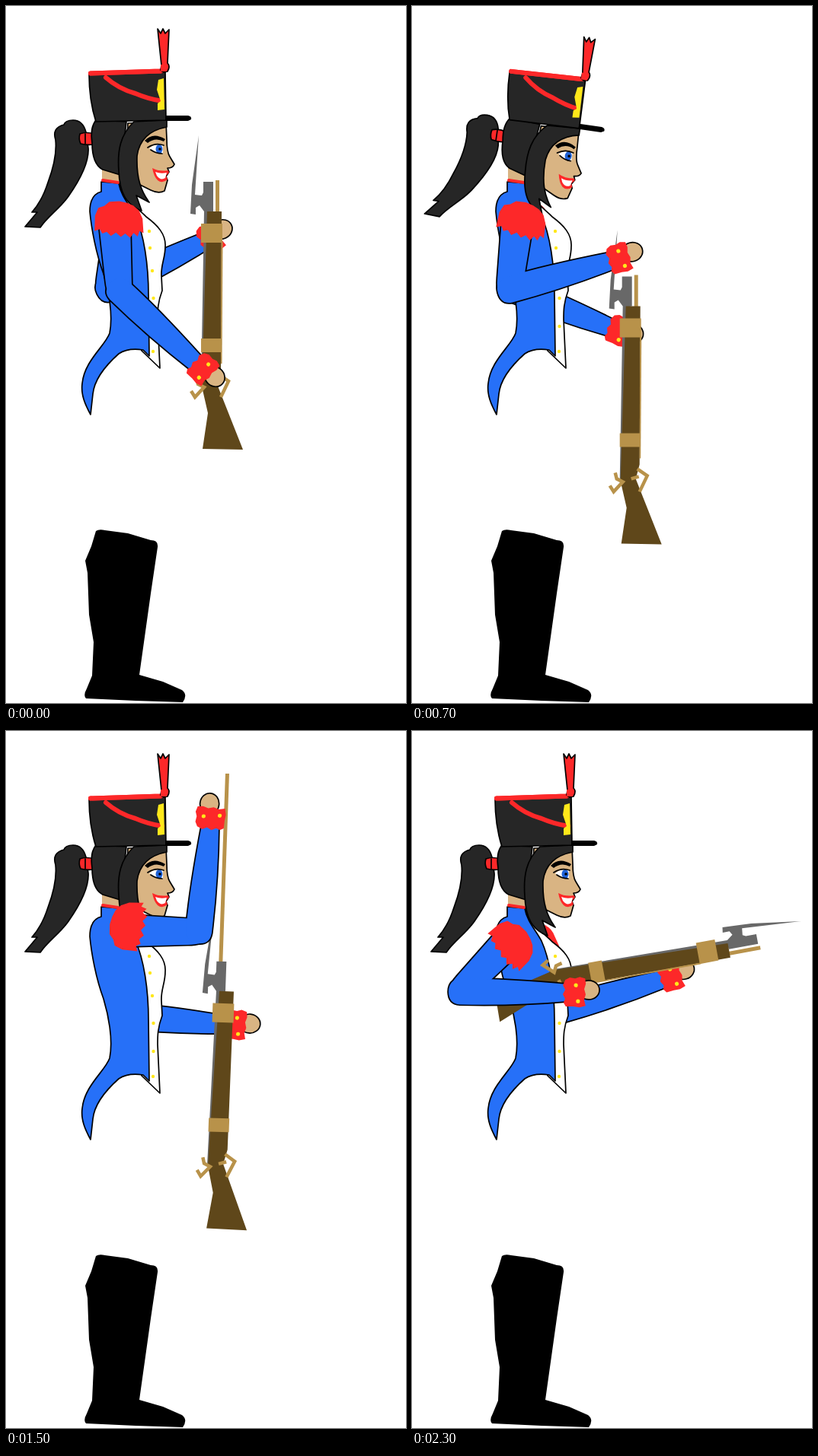
These frames come from a looping animation (525x916 px, 2.5 s). An HTML page:

```html
<!DOCTYPE html>
<html lang="en">
<head>
<meta charset="utf-8">
<title>Loading drill</title>
<style>
html, body { margin: 0; width: 100%; height: 100%; overflow: hidden; background: #fff; }
svg { display: block; width: 525px; height: 916px; }
.blue { fill: #2670f8; }
.red { fill: #fd2829; }
.skin { fill: #d9b483; }
.dark { fill: #262626; }
.wood { fill: #5f471a; }
.steel { fill: #686868; }
.brass { fill: #b8924a; }
.gold { fill: #ffe81a; }
.white { fill: #fff; }
.ink { stroke: #000; stroke-width: 1.7; stroke-linejoin: round; }
.edge { stroke: #000; stroke-width: 3.4; stroke-linejoin: round; }
.line { fill: none; stroke: #000; stroke-width: 1.7; stroke-linecap: round; }
.wire { fill: none; stroke: #b8924a; stroke-width: 4.5; }
.cord { fill: none; stroke: #fd2829; stroke-linecap: round; stroke-linejoin: round; }
</style>
</head>
<body>
<svg viewBox="0 0 525 916">
<defs>
  <path id="upper" d="M-21 14 L-17 98 Q-16 127 1 127 Q17 126 17 108 L21 14Z"/>
  <path id="fore" d="M-17 0 Q-16 -15 0 -15 Q16 -15 17 2 Q18 55 11 142 L-11 142 Q-18 70 -17 0Z"/>
  <g id="hand">
    <ellipse class="skin ink" cx="4" cy="169" rx="12.5" ry="14"/>
    <path class="red" d="M-18 139 l5 -3 5 2 6 -3 6 3 6 -3 7 3 3 6 -1 7 2 6 -2 7 -7 1 -7 -2 -7 2 -7 -2 -8 2 -2 -8 1 -8Z"/>
    <g class="gold"><circle cx="10" cy="152" r="2.6"/><circle cx="-11" cy="155" r="2.6"/></g>
  </g>
  <g id="limb">
  </g>
</defs>

<path d="M118 690 Q122 687 130 689 L160 693 L190 702 Q200 702 199 711 L190 772 L183 822 L175 879 L206 888 L231 899 Q239 905 232 915 L170 913 L105 910 Q101 906 106 897 L113 880 L115 836 L109 800 L107 745 L104 729 L112 710Z"/>

<g id="far">
  <use class="up blue edge" href="#upper"/>
  <use class="low blue edge" href="#fore"/>
  <use class="up blue" href="#upper"/>
  <use class="low blue" href="#fore"/>
  <use class="low" href="#hand"/>
  <path class="up red" d="M-20 8 Q-5 -6 15 -3 Q25 2 27 14 L28 34 L-20 34Z"/>
</g>

<g id="body">
  <path class="skin" d="M126 205 L150 212 L150 234 L126 231Z"/>
  <path class="white ink" d="M148 233 C158 258 174 266 184 277 C199 288 210 300 209 316 C209 332 203 340 204 355 L205 374 C199 390 199 400 199 412 L202 476 L178 453 L170 300Z"/>
  <path class="blue ink" d="M125 231 L148 233 C151 251 163 262 170 276 C181 300 187 340 187 380 L188 460 L180 452 Q160 449 148 457 C130 473 116 490 114 510 L111 537 C104 524 98 511 100 496 C103 466 130 447 136 430 C141 405 134 372 128 352 C118 325 112 292 110 270 Q110 248 125 244Z"/>
  <path class="cord" stroke-width="4" d="M127 229 L147 232"/>
  <g class="gold">
    <circle cx="188" cy="296" r="2.2"/><circle cx="189" cy="318" r="2.2"/><circle cx="192" cy="348" r="2.2"/>
    <circle cx="193.500" cy="384" r="2.2"/><circle cx="193.500" cy="421" r="2.2"/><circle cx="193" cy="454" r="2.2"/>
  </g>
</g>

<g id="head">
  <path class="dark ink" d="M105 166 Q101 150 88 150 Q78 150 76 156 Q60 160 65 176 C67 195 61 216 55 232 C49 251 43 261 34 271 L41 271 L25 290 L45 291 C55 276 71 266 82 250 C96 230 109 205 108 187Z"/>
  <path class="red ink" d="M97 168 Q106 165 115 168 L115 182 Q106 183 98 181 Q95 175 97 168Z"/>
  <path class="line" d="M104 168 V181"/>
  <path class="skin ink" d="M160 154 L210 153 L211 175 Q211 192 215 198 L221 208 Q219 213 212 213 L214 218 L210 224 L212 229 L208 243 Q200 247 190 242 L170 232 L158 190Z"/>
  <path class="dark ink" d="M118 150 Q110 160 113 180 Q113 208 127 215 L150 222 L158 152Z"/>
  <path class="dark ink" d="M168 152 C150 169 146 190 148 217 C149 245 158 262 178 269 L171 249 L188 258 C177 243 171 226 172 197 C175 175 190 163 211 159 L211 150Z"/>
  <path d="M182 177 Q193 165 209 175 L207 178 Q196 172 186 180Z"/>
  <path class="white" d="M188 187 Q196 180 206 183 L206 194 Q194 194 188 187Z"/>
  <ellipse cx="201" cy="188" rx="4.500" ry="6" fill="#1f62d8"/>
  <circle cx="202" cy="188" r="1.8"/>
  <path class="line" d="M186 186 Q196 179 207 183 M190 189 Q197 194 205 194"/>
  <path class="red" d="M192 213 Q201 218 213 216 L214 219 L210 223 L212 228 Q205 234 199 229 Q194 224 192 213Z"/>
  <path class="white" d="M196 218 Q203 221 211 219 L209 226 Q203 230 198 223Z"/>
  <path class="dark ink" d="M109 89 L209 87 L210 150 L118 152 Q109 124 109 89Z"/>
  <path d="M209 144 L239 144 Q244 145 243 149 L239 151 L209 151Z"/>
  <path class="cord" stroke="#000" stroke-width="6" d="M111 88.500 L203 85.500 L211 82"/>
  <path class="cord" stroke-width="6" d="M111 88.500 L203 85.500 L211 82"/>
  <path class="cord" stroke-width="6" d="M131 94 Q148 109 170 115 Q186 122 205 125"/>
  <path class="gold" d="M200 97 L207 95 L208 136 L199 137 L199 128 L203 125 L198 110Z"/>
  <path class="red ink" stroke-width="1" d="M204 78 L199 30 L203 36 L206 30 L209 36 L214 31 L212 75 Q216 79 212 86 Q205 88 203 84Z"/>
  <path class="red" d="M203 77 H211 V86 H203Z"/>
</g>

<g id="gun">
  <path id="rod" class="brass" d="M275 229 h5 v250 h-5Z"/>
  <path class="steel" d="M253 170 L248 248 L257 249 L259 245 L259 231 L272 231 L272 270 L266 271 L262 500 L256 500 L260 270 L254 262 L249 265 L249 274 L242 273 L244 235Z"/>
  <path class="wood" d="M264 270 L283 270 L282 478 L277 497 L311 583 L258 582 L265 535 L257 500 L260 400Z"/>
  <path id="seat" class="brass" d="M282.500 310 h2 l-1 160 h-1.500Z"/>
  <path class="brass" d="M256 286 h28 v25 h-28Z M256 437 h27 v18 h-27Z"/>
  <path class="wire" d="M279 484 L292 493 L282 514 M271 497 L281 494 M250 489 L252 497 L260 501 L248 514 L243 506"/>
</g>

<g id="near">
  <use class="up blue edge" href="#upper"/>
  <use class="low blue edge" href="#fore"/>
  <use class="up blue" href="#upper"/>
  <use class="low blue" href="#fore"/>
  <use class="low" href="#hand"/>
  <path class="up red" d="M-25 12 L-20 2 -12 0 -5 -5 8 -5 18 -2 26 2 33 9 37 20 37 39 32 36 29 43 24 38 19 44 13 38 7 42 1 36 -6 40 -11 34 -17 36 -20 30 -27 32Z"/>
</g>
</svg>
<script>
const LOOP = 2500, STEP = 50, LAST = 2300;
const UPPER = 112, FORE = 140;

// Each row: time, then values
const gunKeys = [
  [0, 270, 298, 0], [500, 286, 413, 0], [550, 288, 419, 0], [950, 284.5, 428, 0],
  [1100, 281, 431, .5], [1250, 271.5, 367, 2.5], [1500, 285, 370, 2],
  [1700, 314.5, 373, .5], [1950, 364, 247, 55.5], [2300, 388, 290, 79.5]
];
const nearKeys = [
  [0, 250, 470], [500, 185, 248], [550, 187, 250], [700, 262, 335], [800, 284, 390],
  [950, 285, 308], [1100, 276, 155], [1150, 266, 150], [1250, 265, 255],
  [1325, 262, 350], [1500, 268, 125], [1550, 284, 125], [1700, 312, 308],
  [1950, 175, 350], [2300, 203, 344]
];
const farKeys = [
  [0, 259, 310], [500, 268, 415], [950, 253, 433], [1250, 275, 421],
  [1700, 303, 358], [1950, 332, 297], [2300, 330, 326]
];
const headKeys = [[0, 0], [500, 20.5], [550, 20.5], [800, 0]];
const rodKeys = [
  [800, 0, 0], [950, 87, 0], [1100, 245, 0], [1150, 245, -13], [1250, 106, -13],
  [1325, 5, -13], [1500, 245, -13], [1550, 245, -2], [1700, 32, -2], [1750, 0, 0]
];

const $ = id => document.getElementById(id);
const head = $('head'), gun = $('gun'), rod = $('rod'), seat = $('seat');

function sample(keys, t) {
  const i = keys.findIndex(k => k[0] > t);
  if (i === 0) return keys[0].slice(1);
  if (i < 0) return keys[keys.length - 1].slice(1);
  const a = keys[i - 1], b = keys[i], p = (t - a[0]) / (b[0] - a[0]);
  return a.slice(1).map((v, j) => v + (b[j + 1] - v) * p);
}

const set = (el, value) => el.setAttribute('transform', value);

function makeArm(id, sx, sy) {
  const up = $(id).querySelectorAll('.up'), low = $(id).querySelectorAll('.low');
  const bone = (x, y, dx, dy) =>
    `translate(${x} ${y}) rotate(${Math.atan2(-dx, dy) * 180 / Math.PI})`;
  // Two-bone reach, elbow bent down and back
  return ([wx, wy]) => {
    const dx = wx - sx, dy = wy - sy, d = Math.hypot(dx, dy);
    const along = (UPPER ** 2 - FORE ** 2 + d * d) / (2 * d);
    const out = Math.sqrt(Math.max(0, UPPER ** 2 - along ** 2));
    const ex = sx + (dx * along - dy * out) / d;
    const ey = sy + (dy * along + dx * out) / d;
    up.forEach(el => set(el, bone(sx, sy, ex - sx, ey - sy)));
    low.forEach(el => set(el, bone(ex, ey, wx - ex, wy - ey)));
  };
}

const nearArm = makeArm('near', 141, 262), farArm = makeArm('far', 155, 262);

function draw() {
  const now = performance.now() % LOOP;
  const t = Math.min(LAST, Math.floor(now / STEP) * STEP);
  const [x, y, turn] = sample(gunKeys, t);
  const [pull, side] = sample(rodKeys, t);
  set(gun, `translate(${x} ${y}) rotate(${turn}) translate(-270 -298)`);
  set(rod, `translate(${side} ${-pull})`);
  seat.style.display = pull ? 'none' : '';
  set(head, `rotate(${sample(headKeys, t)[0]} 139 221.5)`);
  nearArm(sample(nearKeys, t));
  farArm(sample(farKeys, t));
  requestAnimationFrame(draw);
}
draw();
</script>
</body>
</html>
```
